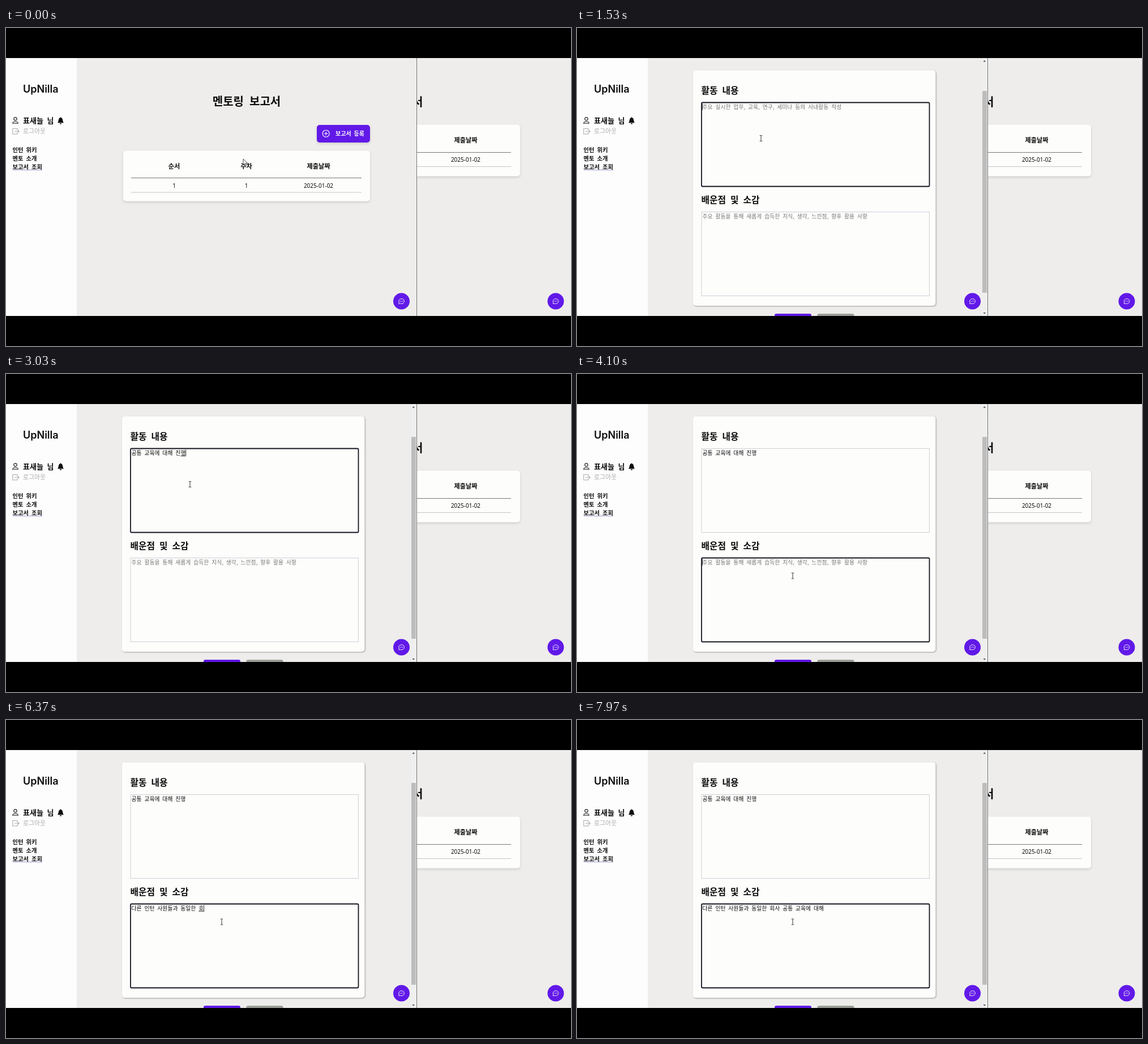
These frames come from a looping animation (998x561 px, 8000 ms). An HTML page:

```html
<!DOCTYPE html>
<html lang="ko">
<head>
<meta charset="utf-8">
<title>멘토링 보고서</title>
<style>
  html, body { margin: 0; width: 100%; height: 100%; overflow: hidden; background: #000; }
  svg { display: block; width: 100%; height: 100%; }
  text { font-family: "Noto Sans CJK KR", "Noto Sans CJK", sans-serif; word-spacing: .22em; white-space: pre; fill: #0c0c0c; }
  .b { font-weight: 700; }
  .mid { text-anchor: middle; }
  .end { text-anchor: end; }
  .logo { font: 600 18px Inter, sans-serif; word-spacing: 0; }
  .num { font-family: "Noto Sans", sans-serif; }
  .hint { fill: #777; }
  .gray { fill: #aaa; }
  .white { fill: #fff; }
  .icon { fill: none; stroke: #222; stroke-width: 1.1; stroke-linejoin: round; stroke-linecap: round; }
  .soft { filter: drop-shadow(0 2px 2px #0002); }
  .hard { filter: drop-shadow(1.5px 1.5px 1px #0005); }
</style>
</head>
<body>
<svg id="stage" viewBox="0 0 998 561" preserveAspectRatio="none"></svg>
<script>
const LOOP = 8000, SCROLL = 62.5, PURPLE = '#6119e8', PAPER = '#fdfdfc', BACK = '#eeedeb';
const stage = document.getElementById('stage');

// Text is placed by its vertical centre.
const text = (x, cy, size, str, cls = '', id = '') =>
  `<text id="${id}" x="${x}" y="${cy + size * .38}" font-size="${size}" class="${cls}">${str}</text>`;
const rect = (x, y, w, h, fill, r = 0, extra = '') =>
  `<rect x="${x}" y="${y}" width="${w}" height="${h}" fill="${fill}" rx="${r}" ${extra}/>`;
const rule = (x1, x2, y, color) =>
  `<path d="M${x1} ${y}H${x2}" stroke="${color}"/>`;
const path = (d, extra = 'class="icon"') => `<path d="${d}" ${extra}/>`;

const chatButton = x => `<g transform="translate(${x} 482)">
  <circle r="14.5" fill="${PURPLE}"/>
  ${path('M-4.6 4.4L-4.4 1.8A4.9 4.4 0 1 1 -1.8 4.1Z', 'fill="none" stroke="#fff" stroke-width=".9" stroke-linejoin="round"')}
  ${[-2, .2, 2.4].map(d => `<circle cx="${d}" r=".65" fill="#fff"/>`).join('')}</g>`;

const rightPane = rect(725, 53, 273, 455, BACK)
  + text(736.5, 130, 20, '멘토링 보고서', 'b end')
  + rect(472, 170.5, 436, 91, PAPER, 5, 'class="soft"')
  + text(812, 198, 11.2, '제출날짜', 'b mid')
  + rule(486, 892, 219.5, '#777') + text(812, 232.5, 10, '2025-01-02', 'num mid')
  + rule(486, 892, 244.5, '#c4c4c8') + chatButton(971);

const sidebar = rect(0, 53, 125, 455, '#fdfdfd')
  + `<text class="logo" x="30" y="113.5">UpNilla</text>`
  + `<circle class="icon" cx="16.5" cy="160.3" r="2.7"/>`
  + path('M11.7 168.2C12 163.9 21 163.9 21.3 168.2Z')
  + text(30, 163, 13, '표새늘 님', 'b')
  + path('M91 167.2C93.4 165 92 158.5 96.2 158V156.8H96.8V158C101 158.5 99.6 165 102 167.2ZM94.8 168H98.2A1.7 1.7 0 0 1 94.8 168Z', 'fill="#0c0c0c"')
  + path('M20 179.5V177.5H11.8V187H20V185M15.5 182.3H23.2L21 180.2M23.2 182.3L21 184.4', 'class="icon" style="stroke:#aaa"')
  + text(30, 182, 10.9, '로그아웃', 'gray')
  + ['인턴 위키', '멘토 소개', '보고서 조회'].map((s, i) => text(11.5, 215 + i * 15, 10.3, s, 'b')).join('')
  + rule(12, 64, 250.5, '#9c9cd2');

const columns = [297, 424.5, 552];
const listPage = `<g id="list">`
  + text(425, 129.5, 20, '멘토링 보고서', 'b mid')
  + rect(549, 171, 94, 31, PURPLE, 5, 'class="soft"')
  + path('M571.2 186.3A6 6 0 1 1 571.2 186.2M562.2 186.3H568.2M565.2 183.3V189.3', 'class="icon" style="stroke:#fff"')
  + text(582, 186, 10, '보고서 등록', 'b white')
  + rect(207, 216.5, 436, 89, PAPER, 5, 'class="soft"')
  + ['순서', '주차', '제출날짜'].map((s, i) => text(columns[i], 243.5, 11.2, s, 'b mid')).join('')
  + rule(221, 628, 264.5, '#777')
  + ['1', '1', '2025-01-02'].map((s, i) => text(columns[i], 278, 10, s, 'num mid')).join('')
  + rule(221, 628, 290, '#c4c4c8') + `</g>`;

const field = (id, title, y, hint) => text(219.5, y - 21.5, 15.8, title, 'b')
  + rect(220, y, 402.5, 148, PAPER, 0, `id="${id}Box"`)
  + text(221.5, y + 7.5, 9.8, hint, 'hint', id + 'Hint')
  + text(221.5, y + 7.5, 9.8, '', '', id + 'Text')
  + path('', `id="${id}Caret" fill="none" stroke="#222" stroke-width=".9"`);

const reportPage = `<g id="report"><g id="scroller">`
  + rect(205, 94, 37, 14.5, PAPER, 4, 'class="hard"') + text(223.5, 101, 10.3, '2주차', 'mid')
  + text(423, 97, 22, '보고서', 'b mid')
  + rect(205, 137, 428.5, 415.5, PAPER, 5, 'class="hard"')
  + field('work', '활동 내용', 194, '주요 실시한 업무, 교육, 연구, 세미나 등의 사내활동 작성')
  + field('learn', '배운점 및 소감', 387, '주요 활동을 통해 새롭게 습득한 지식, 생각, 느낀점, 향후 활용 사항')
  + rect(349, 566.5, 65, 20, PURPLE, 3) + rect(424.5, 566.5, 65, 20, '#9a9f98', 3)
  + `</g>` + rect(715, 53, 10, 455, '#efefef')
  + rect(716, 63, 8, 356, '#bdbdbd', 0, 'id="thumb"')
  + path('M717.5 59.5H722L719.7 57Z', 'id="upArrow"') + path('M717.5 502H722L719.7 504.5Z', 'fill="#444"')
  + `</g>`;

stage.innerHTML = rightPane + rect(0, 53, 725, 455, BACK) + sidebar + listPage + reportPage
  + chatButton(698.5) + path('M725.5 53V508', 'stroke="#777"')
  + `<g id="pointer">${path('M0 0V10.4L2.4 8.2L4 12L5.7 11.3L4.1 7.6H7.4Z', 'id="arrow" fill="#fff" stroke="#222" stroke-width=".8"')}
     ${path('M-2.2 -5H-.6L0 -4.5L.6 -5H2.2M0 -4.5V4.5M-2.2 5H-.6L0 4.5L.6 5H2.2', 'id="beam" fill="none" stroke="#333"')}</g>`
  + rect(0, 0, 998, 53, '#000') + rect(0, 508, 998, 53, '#000');

const el = {};
stage.querySelectorAll('[id]').forEach(node => { if (node.id) el[node.id] = node; });

// Every state of a two-set Korean keyboard while a phrase is typed.
const LEADS = 'ㄱㄲㄴㄷㄸㄹㅁㅂㅃㅅㅆㅇㅈㅉㅊㅋㅌㅍㅎ';
const TAILS = ' ㄱㄲㄳㄴㄵㄶㄷㄹㄺㄻㄼㄽㄾㄿㅀㅁㅂㅄㅅㅆㅇㅈㅊㅋㅌㅍㅎ';
const VOWEL_BASE = { 9: 8, 10: 8, 11: 8, 14: 13, 15: 13, 16: 13, 19: 18 };
const syllable = (l, v, t = 0) => String.fromCharCode(0xAC00 + (l * 21 + v) * 28 + t);

function keystrokes(phrase) {
  const states = [{ str: '', composing: false }];
  const push = (str, composing = true) => states.push({ str, composing });
  let done = '', open = false;
  for (const ch of phrase) {
    if (ch === ' ') {
      push(done += ch, false);
      open = false;
      continue;
    }
    const code = ch.charCodeAt(0) - 0xAC00;
    const l = Math.floor(code / 588), v = Math.floor(code / 28) % 21, t = code % 28;
    const lead = LEADS[l], tail = TAILS.indexOf(lead);
    // A new consonant first joins an open syllable as its final.
    if (open && tail > 0) push(done.slice(0, -1) + String.fromCharCode(done.charCodeAt(done.length - 1) + tail));
    else push(done + lead);
    if (v in VOWEL_BASE) push(done + syllable(l, VOWEL_BASE[v]));
    push(done + syllable(l, v));
    if (t) push(done + ch);
    done += ch;
    open = !t;
  }
  return states;
}

const fields = [
  { id: 'work', y: 194, focus: 1250, blur: 3950, keys: keystrokes('공통 교육에 대해 진행'),
    pace: [[1560, 0], [2990, 26]] },
  { id: 'learn', y: 387, focus: 3950, blur: Infinity, keys: keystrokes('다른 인턴 사원들과 동일한 회사 공통 교육에 대해 '),
    pace: [[4170, 0], [5250, 19], [6360, 38], [7750, 62]] }
];
const mouse = [[0, 419, 231], [270, 595, 188], [340, 595, 188], [620, 309.5, 197.5], [800, 309.5, 197.5],
  [1200, 325, 194.5], [3400, 325, 194.5], [3850, 381, 356]];
const PAGE_SWITCH = 330, SCROLL_START = 660, SCROLL_END = 800;

const linear = p => p;
const smooth = p => p * p * (3 - 2 * p);
const easeOut = p => 1 - (1 - p) ** 2;

function sample(steps, t, col, ease = linear) {
  const next = steps.findIndex(s => s[0] > t);
  if (next === 0) return steps[0][col];
  if (next < 0) return steps[steps.length - 1][col];
  const a = steps[next - 1], b = steps[next];
  return a[col] + (b[col] - a[col]) * ease((t - a[0]) / (b[0] - a[0]));
}

const show = (node, on) => node.setAttribute('visibility', on ? 'inherit' : 'hidden');
const set = (node, attrs) => { for (const k in attrs) node.setAttribute(k, attrs[k]); };

function drawField(f, t) {
  const focused = t >= f.focus && t < f.blur;
  const { str, composing } = f.keys[Math.min(f.keys.length - 1, Math.floor(sample(f.pace, t, 1)))];
  set(el[f.id + 'Box'], focused
    ? { stroke: '#15131f', 'stroke-width': 1.8, rx: 2 }
    : { stroke: '#cfcfd6', 'stroke-width': 1, rx: 0 });
  show(el[f.id + 'Hint'], !str);
  const label = el[f.id + 'Text'];
  if (label.textContent !== str) label.textContent = str;
  const top = f.y + 2, bottom = f.y + 13.2;
  let d = '';
  if (focused && !str) d = `M221.7 ${top}V${bottom}`;
  else if (focused && composing) {
    const last = str.length - 1;
    const x1 = label.getStartPositionOfChar(last).x, x2 = label.getEndPositionOfChar(last).x + .3;
    d = `M${x1} ${bottom}H${x2}V${top}`;
  }
  set(el[f.id + 'Caret'], { d });
}

function draw(t) {
  const onReport = t >= PAGE_SWITCH;
  show(el.list, !onReport);
  show(el.report, onReport);

  const p = sample([[SCROLL_START, 0], [SCROLL_END, 1]], t, 1, easeOut);
  set(el.scroller, { transform: `translate(0 ${-SCROLL * p})` });
  set(el.thumb, { y: 63 + 48 * p });
  set(el.upArrow, { fill: p ? '#444' : '#aaa' });
  fields.forEach(f => drawField(f, t));

  const x = sample(mouse, t, 1, smooth), y = sample(mouse, t, 2, smooth);
  const inText = onReport && x > 220 && x < 623
    && fields.some(f => y > f.y - SCROLL * p && y < f.y + 148 - SCROLL * p);
  set(el.pointer, { transform: `translate(${x} ${y})` });
  show(el.arrow, !inText);
  show(el.beam, inText);
}

function tick() {
  draw(performance.now() % LOOP);
  requestAnimationFrame(tick);
}
tick();
</script>
</body>
</html>
```
